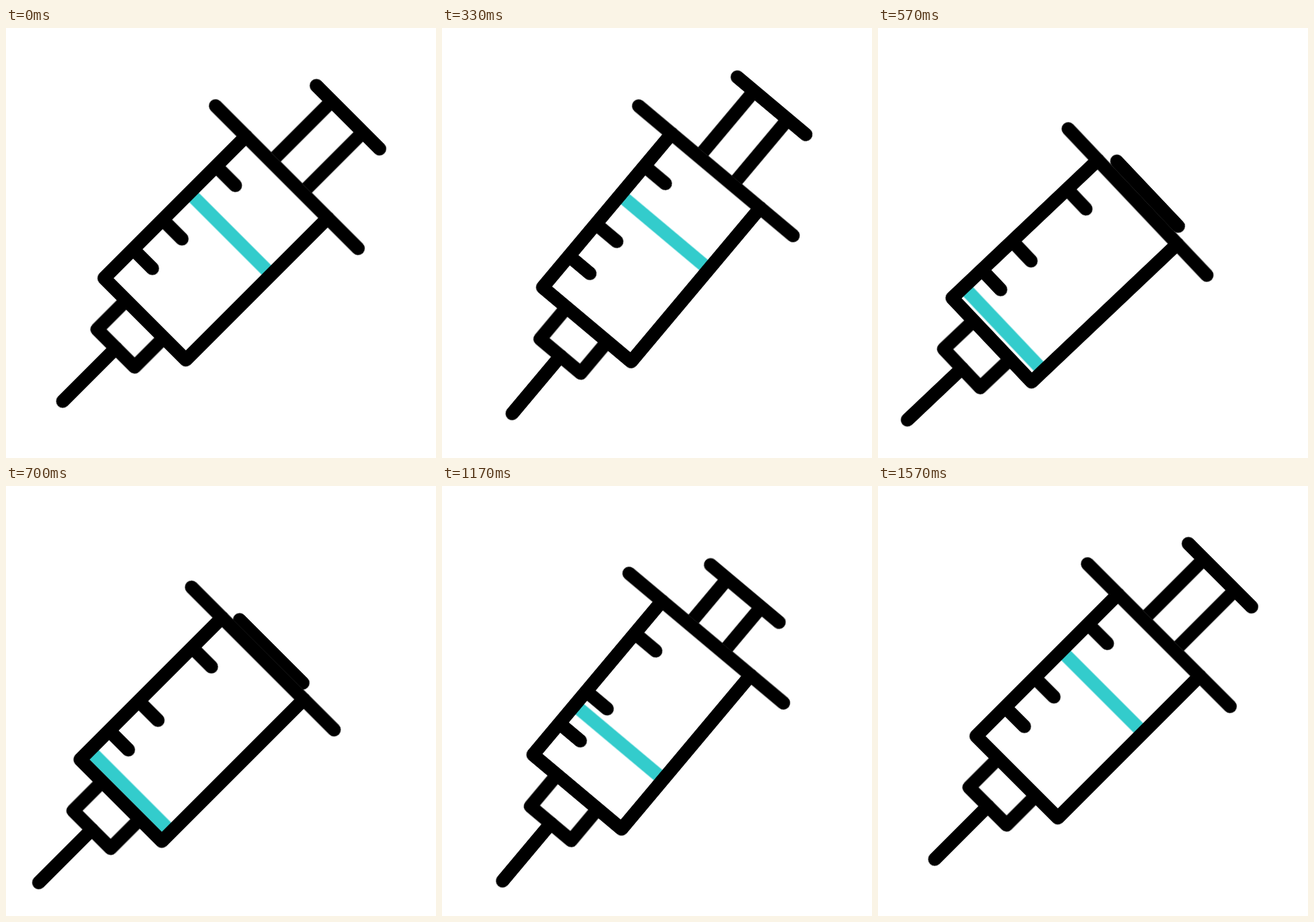
Write an HTML page that moves like this. It is 640 px wide and 640 px high and loops after 1670 ms.

```html
<!DOCTYPE html>
<html lang="en">
<head>
<meta charset="utf-8">
<title>Syringe</title>
<style>
  html, body { margin: 0; width: 100%; height: 100%; overflow: hidden; background: #fff; }
  svg { display: block; width: 100%; height: 100%; }
  .ink { fill: none; stroke: #000; stroke-width: 20; stroke-linecap: round; stroke-linejoin: round; }
  .rod { stroke-linecap: butt; }
  .fluid { stroke: #3cc; stroke-width: 20; }

  .push, .tilt, .plunger, .fluid {
    animation: 1670ms cubic-bezier(.5, 0, .5, 1) infinite;
  }
  .push { animation-name: push; }
  .tilt {
    transform-origin: 304.5px 336px;
    animation-name: tilt;
    animation-timing-function: cubic-bezier(.55, 0, .45, 1);
  }
  .plunger { animation-name: plunge; }
  .fluid { animation-name: drain; }

  @keyframes tilt {
    0%, 12.28% { transform: rotate(0deg); }
    19.9% { transform: rotate(-5deg); }
    29.94% { transform: rotate(2deg); }
    41.92%, 59.3% { transform: rotate(0deg); }
    70% { transform: rotate(-5deg); }
    79.8% { transform: rotate(2deg); }
    89.82%, 100% { transform: rotate(0deg); }
  }
  @keyframes push {
    0%, 20.06% { transform: translate(0px, 0px); }
    36.35%, 58.98% { transform: translate(-35.7px, 34.8px); }
    79.22%, 100% { transform: translate(0px, 0px); }
  }
  @keyframes plunge {
    0%, 20.06% { transform: translate(0px, 0px); }
    36.35%, 60.3% { transform: translate(-111px, 0px); }
    77.43%, 100% { transform: translate(0px, 0px); }
  }
  @keyframes drain {
    0%, 20.06% { transform: translate(0px, 0px); }
    36.35%, 60.78% { transform: translate(-160px, 0px); }
    79.82%, 100% { transform: translate(0px, 0px); }
  }
</style>
</head>
<body>
<svg viewBox="0 0 640 640" role="img" aria-label="Syringe">
  <clipPath id="above"><rect x="148.6" y="-120" width="200" height="240"/></clipPath>
  <g class="push">
    <g class="tilt">
      <!-- Local axes: x runs from needle to plunger, y across the barrel -->
      <g transform="translate(320 320) rotate(-45)">
        <path class="fluid" d="M19.5 -86V86"/>
        <g clip-path="url(#above)">
          <g class="plunger ink">
            <path class="rod" d="M266 -32.7H100M266 32.7H100"/>
            <path d="M266 -65.3V67.7"/>
          </g>
        </g>
        <g class="ink">
          <path d="M138.6 -150V150"/>
          <path d="M138.6 -86H-160V86H138.6"/>
          <path d="M75.7 -86V-45.6M-36.8 -86V-45.6M-99 -86V-45.6"/>
          <path d="M-160 -39.6H-221.3V39.6H-160"/>
          <path d="M-221.3 0H-333"/>
        </g>
      </g>
    </g>
  </g>
</svg>
</body>
</html>
```
